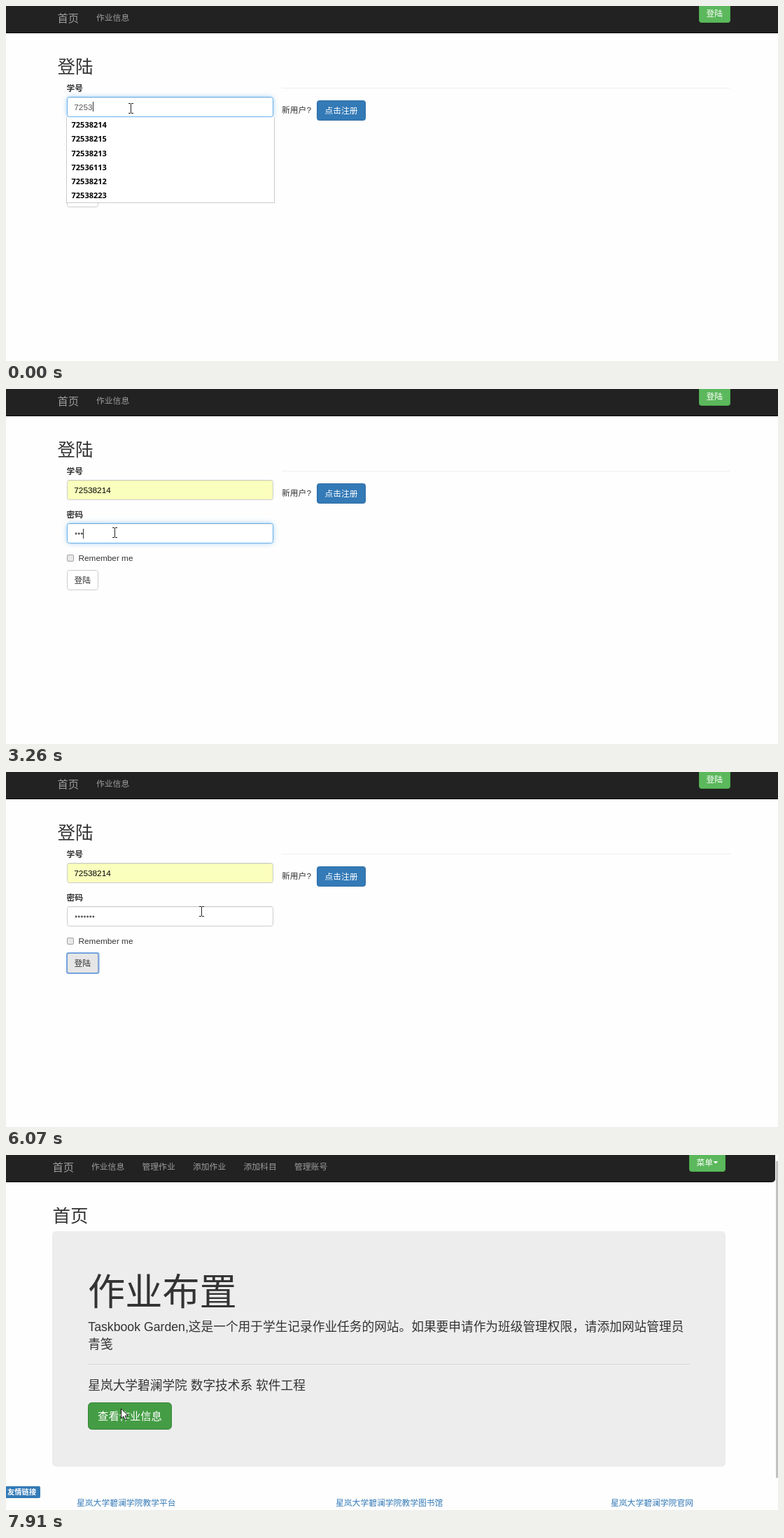
An HTML page with a canvas that plays this animation: 1103 by 508 pixels, repeating every 8000 ms.

```html
<!DOCTYPE html>
<html lang="zh-CN">
<head>
<meta charset="utf-8">
<title>登陆</title>
<style>
html, body { margin: 0; width: 100%; height: 100%; overflow: hidden; background: #fefefe; }
canvas { display: block; }
</style>
</head>
<body>
<canvas id="stage" width="1103" height="508"></canvas>
<script>
const ctx = document.getElementById('stage').getContext('2d');
const LOOP = 8000;
const BASE = 11.8;
const SANS = '"Liberation Sans", "Noto Sans CJK SC", "Noto Sans CJK", sans-serif';
const LIST = '"Noto Sans", "Open Sans", sans-serif';

const PREFIX = '7253';
const IDS = ['8214', '8215', '8213', '6113', '8212', '8223'].map(s => PREFIX + s);
const SCHOOL = '星岚大学碧澜学院';

const I = 'beam', A = 'arrow';
// time, x, y, shape; every pose holds until the next one
const POINTER = [
  [0, 178, 146, I], [830, 175, 156, A], [990, 168, 164, A], [1150, 162, 168, A],
  [1480, 160, 178, A], [1650, 157, 192, A], [1810, 156, 200, I], [1970, 155, 205, I],
  [4670, 150, 228, A], [4800, 141, 262, A], [4940, 133, 290, A],
  [5220, 127, 281, A], [5350, 123, 276, A], [5790, 180, 254, A],
  [5930, 240, 222, A], [6070, 279, 199, I], [6220, 276, 195, I],
  [6680, 258, 148, A], [6814, 228, 106, A], [6948, 196, 178, I],
  [7082, 170, 258, I], [7216, 160, 326, I], [7350, 164, 363, A]
];
const KEY_TIMES = [2960, 3110, 3260, 3530, 3810, 4090, 4230];

// Text is placed by its vertical centre
function text(str, x, cy, { size = BASE, color = '#333', weight = 400, family = SANS, align = 'left' } = {}) {
  ctx.font = `${weight} ${size}px ${family}`;
  ctx.fillStyle = color;
  ctx.textAlign = align;
  ctx.fillText(str, x, cy + size * 0.37);
}

function rect(x, y, w, h, color) {
  ctx.fillStyle = color;
  ctx.fillRect(x, y, w, h);
}

function box(x, y, w, h, radius, fill, border, glow) {
  ctx.beginPath();
  ctx.roundRect(x + 0.5, y + 0.5, w - 1, h - 1, radius);
  ctx.save();
  if (glow) {
    ctx.shadowColor = glow;
    ctx.shadowBlur = 7;
  }
  ctx.fillStyle = fill;
  ctx.fill();
  ctx.restore();
  ctx.lineWidth = 1;
  ctx.strokeStyle = border;
  ctx.stroke();
}

function field(y, fill, focused) {
  box(87, y, 295, 29, 3, fill, focused ? '#66afe9' : '#ccc', focused && 'rgba(102,175,233,.7)');
  rect(89, y + 1, 291, 1, 'rgba(0,0,0,.06)');
}

function textCaret(x, y) {
  rect(x, y, 1, 14, '#333');
}

function navbar(width, corner) {
  ctx.beginPath();
  ctx.roundRect(0, -6, width, 45, [0, 0, corner, 0]);
  ctx.fillStyle = '#080808';
  ctx.fill();
  ctx.beginPath();
  ctx.roundRect(0, -6, width, 44, [0, 0, corner, 0]);
  ctx.fillStyle = '#222';
  ctx.fill();
}

function navItems(x, items) {
  text('首页', x, 17, { size: 15.3, color: '#9d9d9d' });
  items.forEach((item, i) => text(item, x + 55.5 + i * 72.5, 17, { color: '#9d9d9d' }));
}

function pointer(t) {
  const [, x, y, shape] = POINTER.findLast(p => p[0] <= t);
  if (shape === I) {
    rect(x, y - 6, 1, 13, '#222');
    for (const end of [y - 7, y + 7]) {
      rect(x - 3, end, 3, 1, '#222');
      rect(x + 1, end, 3, 1, '#222');
    }
    return;
  }
  const outline = [[0, 0], [0, 14], [3.2, 11], [5.6, 16], [7.8, 15], [5.5, 10.2], [10, 10]];
  ctx.beginPath();
  outline.forEach(([dx, dy]) => ctx.lineTo(x + 0.5 + dx, y + dy));
  ctx.closePath();
  ctx.fillStyle = '#fff';
  ctx.fill();
  ctx.lineWidth = 1;
  ctx.strokeStyle = '#111';
  ctx.stroke();
}

function suggestions(hovered) {
  rect(86, 159, 298, 123, '#ccc');
  rect(87, 159, 296, 122, '#fff');
  if (hovered) rect(87, 160, 296, 20, '#e0e0e0');
  IDS.forEach((id, i) => text(id, 93.5, 170 + i * 20.25, { size: 11, weight: 700, color: '#000', family: LIST }));
}

function loginButton(t) {
  const hovered = t >= 5220;
  const focused = t >= 5350;
  box(87, 259, 45, 29, 3, hovered ? '#e6e6e6' : '#fff', hovered ? '#adadad' : '#ccc');
  if (focused) {
    ctx.beginPath();
    ctx.roundRect(87, 259, 45.5, 29, 2);
    ctx.lineWidth = 2;
    ctx.strokeStyle = 'rgba(94,150,226,.8)';
    ctx.stroke();
  }
  text('登陆', 97.5, 273.5);
}

function loginPage(t) {
  const listOpen = t < 1310;
  const filled = t >= 990;
  const onPassword = t >= 2120 && t < 5350;

  navbar(1103, 0);
  navItems(73.5, ['作业信息']);
  box(990, -6, 45, 30, 3, '#5cb85c', '#4cae4c');
  text('登陆', 1000.5, 10.5, { color: '#fff' });

  text('登陆', 73.5, 87, { size: 25.5 });
  rect(394, 117, 641, 1, '#eee');
  text('新用户?', 394, 148.5);
  box(444, 135, 70, 29, 3, '#337ab7', '#2e6da4');
  text('点击注册', 479, 149.5, { color: '#fff', align: 'center' });

  text('学号', 86.5, 117.5, { weight: 700 });
  field(130, filled ? '#faffbd' : '#fff', t < 2120);
  text(filled ? IDS[0] : PREFIX, 97.3, 144.5, { color: filled ? '#000' : '#555' });
  if (t < 530) textCaret(124, 137);

  text('密码', 86.5, 179.5, { weight: 700 });
  field(192, '#fff', onPassword);
  const typed = KEY_TIMES.filter(k => t >= k).length;
  const pitch = 4.13;
  ctx.fillStyle = '#555';
  for (let i = 0; i < typed; i++) {
    ctx.beginPath();
    ctx.arc(98 + pitch * (i + 0.5), 207, 1.45, 0, Math.PI * 2);
    ctx.fill();
  }
  if ((t >= 2240 && t < 2520) || (typed && t < 4800)) {
    textCaret(Math.floor(98 + pitch * typed), 200);
  }

  box(87, 237, 10, 10, 1.5, '#e8e8e8', '#a3a3a3');
  text('Remember me', 103.5, 242);
  loginButton(t);
  if (listOpen) suggestions(filled);
}

function homePage(t) {
  navbar(1099, 5);
  navItems(66.5, ['作业信息', '管理作业', '添加作业', '添加科目', '管理账号']);
  box(976, -6, 52, 30, 3, '#5cb85c', '#4cae4c');
  text('菜单', 986.5, 10.5, { color: '#fff' });
  ctx.beginPath();
  ctx.moveTo(1010.5, 9);
  ctx.lineTo(1017.3, 9);
  ctx.lineTo(1013.9, 12.4);
  ctx.fillStyle = '#fff';
  ctx.fill();
  rect(1100, 9, 3, 453, '#c1c1c1');

  text('首页', 66.5, 87, { size: 25.5 });
  box(66, 109, 962, 337, 5, '#ededed', '#ededed');
  text('作业布置', 117, 195, { size: 53.2 });
  const lead = { size: 17.7, weight: 300 };
  text('Taskbook Garden,这是一个用于学生记录作业任务的网站。如果要申请作为班级管理权限，请添加网站管理员', 117.3, 245.5, lead);
  text('青笺', 117.3, 270.5, lead);
  rect(117, 299, 861, 1, '#d9d9d9');
  text(SCHOOL + ' 数字技术系 软件工程', 117.3, 329.5, lead);

  const pressed = t >= 7780 && t < 7910;
  const hovered = t >= 7350;
  const fill = pressed ? '#398439' : hovered ? '#449d44' : '#5cb85c';
  box(117, 354, 120, 39, 5, fill, pressed ? '#255625' : hovered ? '#398439' : '#4cae4c');
  text('查看作业信息', 177, 373.5, { size: 15.3, color: '#fff', align: 'center' });

  ctx.beginPath();
  ctx.roundRect(0, 474, 49, 17, [0, 2, 2, 0]);
  ctx.fillStyle = '#337ab7';
  ctx.fill();
  text('友情链接', 2, 482, { size: 10.3, weight: 700, color: '#fff' });
  const link = { color: '#337ab7' };
  text(SCHOOL + '教学平台', 101, 498, link);
  text(SCHOOL + '教学图书馆', 471, 498, link);
  text(SCHOOL + '官网', 864, 498, link);
}

function draw(now) {
  const t = now % LOOP;
  rect(0, 0, 1103, 508, '#fefefe');
  if (t < 6220) loginPage(t);
  else homePage(t);
  pointer(t);
  requestAnimationFrame(draw);
}
requestAnimationFrame(draw);
</script>
</body>
</html>
```
